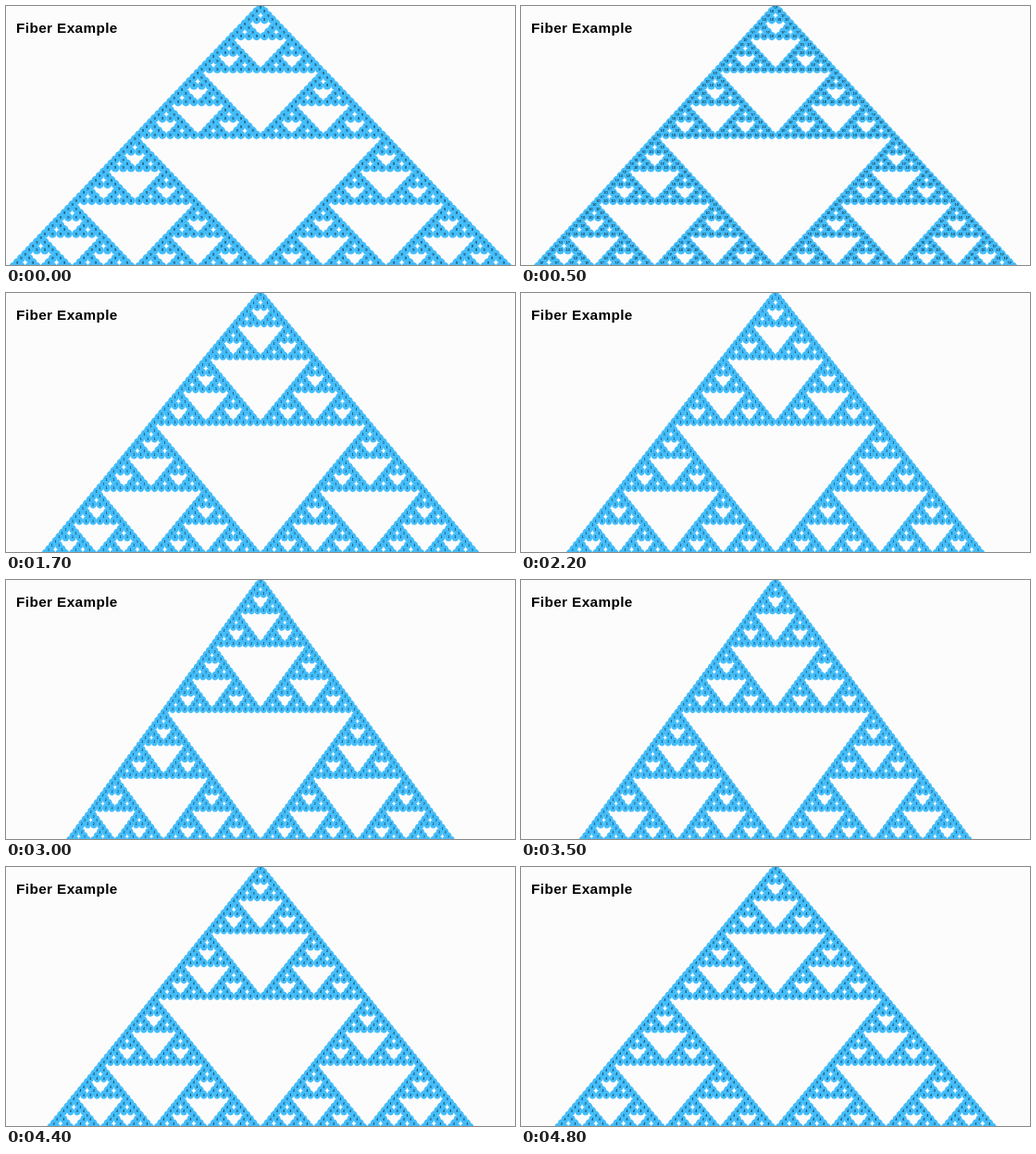
An HTML page with a canvas that plays this animation: 550 px wide and 280 px high, repeating every 4900 ms.

```html
<!DOCTYPE html>
<html lang="en">
<head>
<meta charset="utf-8">
<title>Fiber Example</title>
<style>
  html, body { margin: 0; width: 550px; height: 280px; overflow: hidden; background: #fcfcfd; }
  canvas { display: block; }
  h1 {
    position: absolute; left: 11px; top: 15px; margin: 0;
    font: bold 15.3px/18px "Liberation Sans", Arial, sans-serif;
    letter-spacing: 0.4px; color: #000;
  }
</style>
</head>
<body>
<canvas id="stage" width="550" height="280"></canvas>
<h1>Fiber Example</h1>
<script>
const ctx = document.getElementById('stage').getContext('2d');
const LOOP = 4900, STEP = 100;
const SCALE_X = 0.2057, SCALE_Y = 0.2848;
const GAP = 15.625;      // row spacing before scaling
const RADIUS = 16.25;
const TURN = 3.19;       // second at which the triangle is narrowest
const FIRST_TICK = 0.3;  // second at which the counter first advances

function dot(x, y, label) {
  ctx.fillStyle = '#44bdfa';
  ctx.beginPath();
  ctx.arc(x, y, RADIUS, 0, 2 * Math.PI);
  ctx.fill();
  ctx.fillStyle = '#000';
  ctx.fillText(label, x, y + 5.2);
}

// Sierpinski triangle with its apex dot at (x, y)
function triangle(x, y, rows, label) {
  if (rows === 1) return dot(x, y, label);
  const half = rows / 2, d = half * GAP;
  triangle(x, y, half, label);
  triangle(x - d, y + d, half, label);
  triangle(x + d, y + d, half, label);
}

function draw(ms) {
  const t = Math.floor(ms % LOOP / STEP) * STEP / 1000;
  const scale = 1 + Math.abs(t - TURN) / 10;
  const ticks = Math.floor(t - FIRST_TICK + 1e-6);
  const label = (ticks + 9) % 10 + 1;

  ctx.setTransform(1, 0, 0, 1, 0, 0);
  ctx.clearRect(0, 0, 550, 280);
  ctx.setTransform(SCALE_X * scale, 0, 0, SCALE_Y, 275, 1.4);
  ctx.font = '15px "Liberation Sans", Arial, sans-serif';
  ctx.textAlign = 'center';
  triangle(0, 0, 64, label);
}

const start = performance.now();
function frame() {
  draw(performance.now() - start);
  requestAnimationFrame(frame);
}
frame();
</script>
</body>
</html>
```
